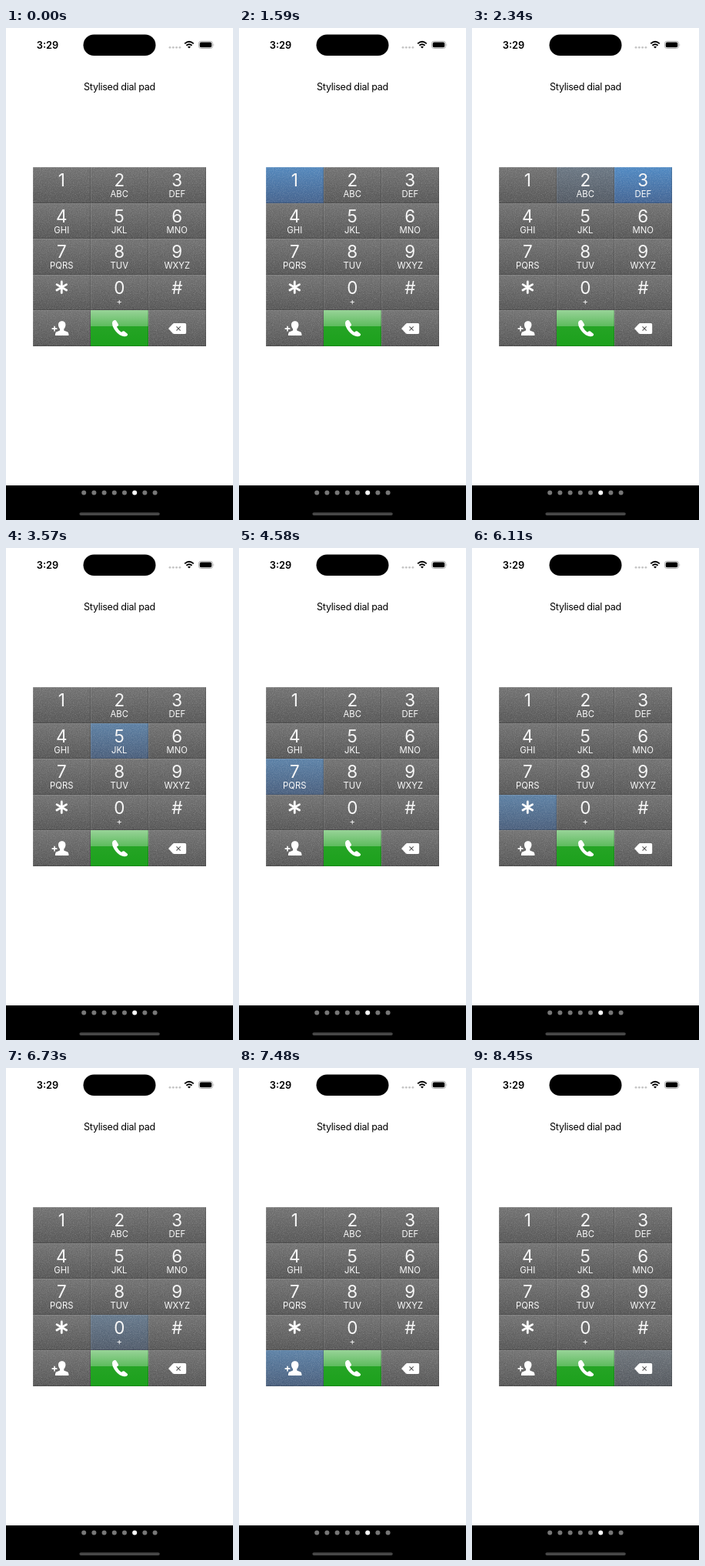
Write an HTML page that moves like this. It is 295x640 px and loops after 9940 ms.

```html
<!DOCTYPE html>
<html lang="en">
<head>
<meta charset="utf-8">
<title>Stylised dial pad</title>
<style>
  html, body { margin: 0; width: 100%; height: 100%; overflow: hidden; background: #fff; }
  svg { display: block; width: 100vw; height: 100vh; }
  text { font-family: Inter, Roboto, sans-serif; text-anchor: middle; }
  .digit { font-size: 22.5px; fill: #f6f6f6; }
  .sub { font-size: 11.3px; fill: #fafafa; }
</style>
</head>
<body>
<svg viewBox="0 0 295 640">
  <defs>
    <linearGradient id="grey" x2="0" y2="1">
      <stop stop-color="#717171"/><stop offset="1" stop-color="#555"/>
    </linearGradient>
    <linearGradient id="blue" x2="0" y2="1">
      <stop stop-color="#4f89c3"/><stop offset="1" stop-color="#416291"/>
    </linearGradient>
    <linearGradient id="green" x2="0" y2="1">
      <stop stop-color="#98d398"/><stop offset=".45" stop-color="#5dbb5d"/>
      <stop offset=".45" stop-color="#25a425"/><stop offset="1" stop-color="#1ca11c"/>
    </linearGradient>
    <filter id="grain" x="0" y="0" width="1" height="1">
      <feTurbulence type="fractalNoise" baseFrequency=".9" numOctaves="2" seed="4"/>
      <feColorMatrix values="0 0 0 0 1  0 0 0 0 1  0 0 0 0 1  .35 0 0 0 -.13"/>
    </filter>
  </defs>

  <!-- status bar -->
  <text x="54" y="26.5" font-size="12.8" font-weight="600">3:29</text>
  <rect x="100.5" y="8.5" width="94" height="27.5" rx="13.75"/>
  <g fill="#c4c4c4">
    <circle cx="213" cy="25.3" r="1.4"/><circle cx="217.3" cy="25.3" r="1.4"/>
    <circle cx="221.6" cy="25.3" r="1.4"/><circle cx="225.9" cy="25.3" r="1.4"/>
  </g>
  <path d="M232.2 20.4q5.8-5.2 11.6 0M234.4 22.8q3.6-3.1 7.2 0" fill="none" stroke="#000" stroke-width="1.9"/>
  <path d="M238 26.6l-2-2.1q2-1.6 4 0z"/>
  <rect x="250.4" y="17.3" width="18.2" height="9.2" rx="3" fill="none" stroke="#a5a5a5" stroke-width=".9"/>
  <rect x="251.7" y="18.6" width="15.6" height="6.6" rx="1.8"/>
  <path d="M269.7 20.4q1.4 1.5 0 3z" fill="#a5a5a5"/>

  <text x="147.5" y="80.5" font-size="12.6" letter-spacing="-.3">Stylised dial pad</text>

  <g id="pad"></g>

  <!-- icons -->
  <path d="M72.3 330v14.6M66 333.6l12.6 7.4M66 341l12.6-7.4" stroke="#fff" stroke-width="2.8" stroke-linecap="round"/>
  <g fill="#fff">
    <path d="M59.6 390.3h2.6v-2.6h1.6v2.6h2.6v1.6h-2.6v2.6h-1.6v-2.6h-2.6z"/>
    <path d="M72.7 381.3c3.4 0 4.9 2.3 4.7 5.2-.1 2.2-1 3.8-2.1 5v1.9l4.4 1.9q1.8.8 1.8 4.7h-17.6q0-3.9 1.8-4.7l4.4-1.9v-1.9c-1.1-1.2-2-2.8-2.1-5-.2-2.9 1.3-5.2 4.7-5.2z"/>
    <path d="M138 384q0-3 3-4 1.5-.4 2.3 1l2.6 4.2q.7 1.2-.4 2.2l-1.6 1.4q2.2 4.4 6 7l1.7-1.2q1.1-.8 2.2 0l3.7 2.9q1.2 1 .4 2.2-1.6 2-4.5 1.6-6-1-10.6-6.5T138 384z"/>
    <path d="M211 391l5.6-6q.9-.9 2-.9h14q1.6 0 1.6 1.6v10.6q0 1.6-1.6 1.6h-14q-1.1 0-2-.9z"/>
  </g>
  <path d="M221.5 388.4l5.2 5.2m0-5.2l-5.2 5.2" stroke="#555" stroke-width="1.1"/>

  <!-- page control and home indicator -->
  <rect y="595" width="295" height="45"/>
  <g id="dots"></g>
  <rect x="95.4" y="630.2" width="104.4" height="3.8" rx="1.9" fill="#474747"/>
</svg>
<script>
const LEFT = 35, TOP = 181, W = 75, H = 46.6, CALL = 13;
const LOOP = 9940, STEP = 106.4, FADE = 420, LAST = 8450;

const labels = ['1', '2 ABC', '3 DEF', '4 GHI', '5 JKL', '6 MNO', '7 PQRS', '8 TUV',
                '9 WXYZ', '', '0 +', '#', '', '', ''];
// Moment each key is pressed, in reading order
const presses = [1480, 1930, 2320, 3030, 3330, 3700, 4360, 4690, 5040,
                 5790, 6290, 6660, 7270, 7640, 8010];
const hold = i => i === 9 ? 160 : 70;
const bursts = [1480, 3030, 4360, 5790];

function add(parent, tag, attrs, text = '') {
  const el = document.createElementNS('http://www.w3.org/2000/svg', tag);
  for (const k in attrs) el.setAttribute(k, attrs[k]);
  el.textContent = text;
  return parent.appendChild(el);
}

const pad = document.getElementById('pad');
const rowTop = row => Math.round(TOP + row * H);

function box(i) {
  const row = Math.floor(i / 3), y = rowTop(row);
  return { x: LEFT + i % 3 * W, y, width: W, height: rowTop(row + 1) - y };
}

const glows = labels.map((_, i) => {
  add(pad, 'rect', { ...box(i), fill: i === CALL ? 'url(#green)' : 'url(#grey)' });
  return add(pad, 'rect', { ...box(i), fill: 'url(#blue)', opacity: 0 });
});

labels.forEach((label, i) => {
  const { x, y, width, height } = box(i);
  if (i !== CALL) {
    add(pad, 'rect', { ...box(i), filter: 'url(#grain)' });
    add(pad, 'path', { d: `M${x} ${y + .5}h${width}M${x + .5} ${y}v${height}`, stroke: '#fff', 'stroke-opacity': .1, fill: 'none' });
  }
  add(pad, 'path', { d: `M${x} ${y + height - .5}h${width}M${x + width - .5} ${y}v${height}`, stroke: '#000', 'stroke-opacity': .16, fill: 'none' });
  const [digit, sub] = label.split(' ');
  if (digit) add(pad, 'text', { x: x + width / 2 - .2, y: y + 25, class: 'digit' }, digit);
  if (sub) add(pad, 'text', { x: x + width / 2 - .2, y: y + 39, class: 'sub' }, sub);
});

const dots = document.getElementById('dots');
for (let i = 0; i < 8; i++)
  add(dots, 'circle', { cx: 101.2 + i * 13.2, cy: 604.6, r: 3, fill: i === 5 ? '#fff' : '#777' });

// The screen refreshes in even steps from the start of each burst of taps
function stepped(t) {
  const start = bursts.filter(b => b <= t).pop();
  if (start === undefined) return 0;
  return Math.min(LAST, start + Math.floor((t - start) / STEP + .15) * STEP);
}

function draw(now) {
  const t = stepped(now % LOOP);
  glows.forEach((glow, i) => {
    const age = t - presses[i];
    const level = age < 0 ? 0 : 1 - (age - hold(i)) / FADE;
    glow.setAttribute('opacity', Math.max(0, Math.min(1, level)));
  });
  requestAnimationFrame(draw);
}
requestAnimationFrame(draw);
</script>
</body>
</html>
```
